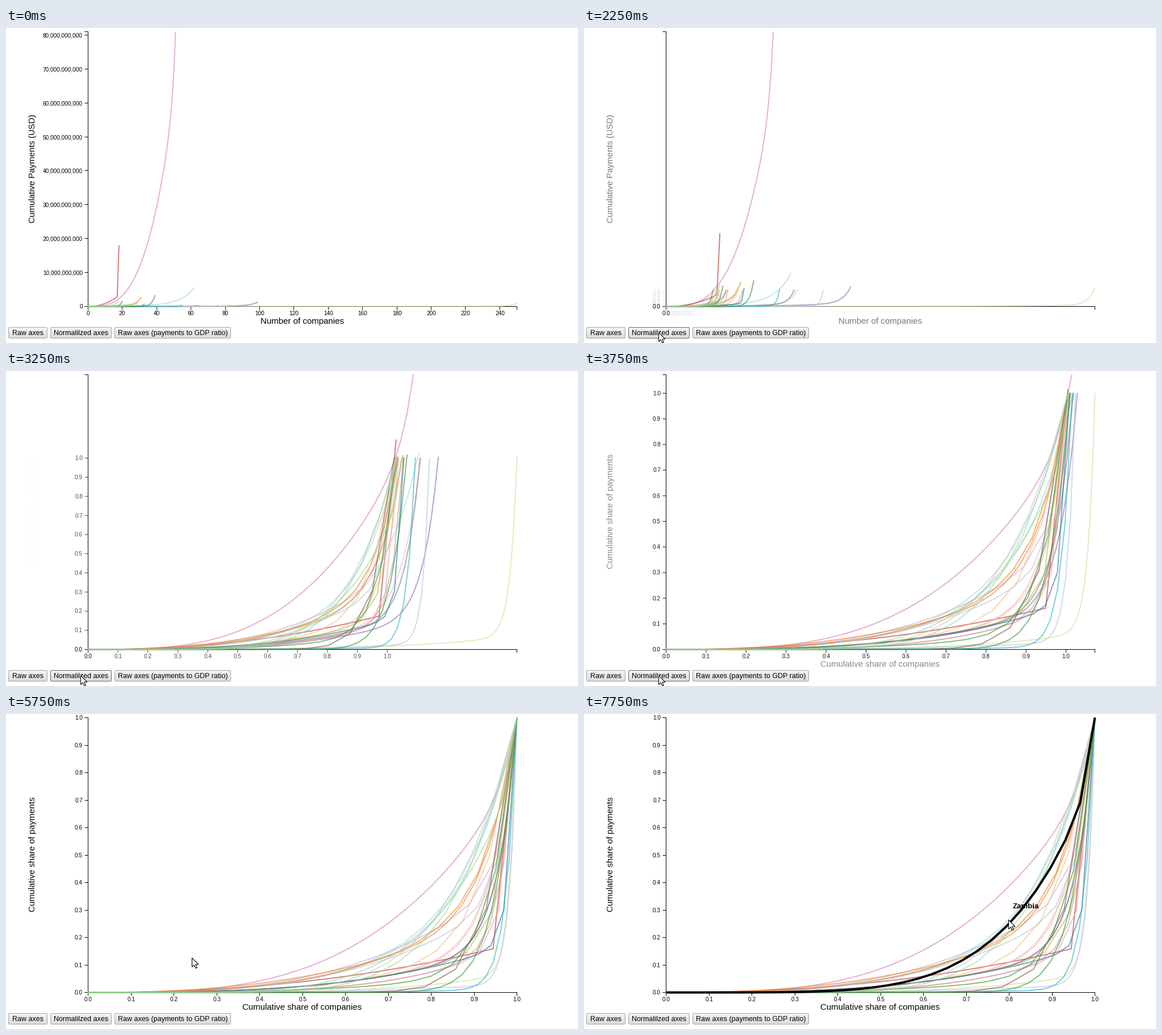
Recreate the animation shown at these times as a matplotlib script. Size 1007 px wide and 556 px high, loop 8 s.

```python
import numpy as np
import matplotlib.pyplot as plt
from matplotlib.animation import FuncAnimation
from matplotlib.colors import to_rgb
from matplotlib.patches import FancyBboxPatch, Polygon

WIDTH, HEIGHT = 1007, 556
STEP, FRAMES = 250, 32
X0, Y0, W, H = 144.5, 491.5, 755, 485
RAW_X, RAW_Y = 250, 81          # companies, billions of USD
START, DURATION = 1520, 3000
SVG_RIGHT = 932
TIP_TIME = 7750
OPACITY = .62

# Category colours come in dark/light pairs.
BLUE, ORANGE, GREEN, RED, PURPLE, BROWN, PINK, GRAY, OLIVE, CYAN = plt.cm.tab20.colors[::2]
(L_BLUE, L_ORANGE, L_GREEN, L_RED, L_PURPLE, L_BROWN, L_PINK, L_GRAY, L_OLIVE,
 L_CYAN) = plt.cm.tab20.colors[1::2]

plt.rcParams["font.family"] = "Liberation Sans"
fig = plt.figure(figsize=((WIDTH + .01) / 72, (HEIGHT + .01) / 72), dpi=72,
                 facecolor="white")
ax = fig.add_axes([0, 0, 1, 1])


def ease(t):
    t = min(max(t, 0), 1)
    return 4 * t ** 3 if t < .5 else 1 - 4 * (1 - t) ** 3


def muted(color, amount=.18):
    rgb = np.array(to_rgb(color))
    return rgb + amount * (rgb @ [.3, .59, .11] - rgb)


class Curve:
    """Concentration curve: a broad part u^body plus a steep part u^tail."""

    def __init__(self, color, count, tail, share=.18, body=3, total=.3):
        self.u = np.arange(count + 1) / count
        self.v = share * self.u ** body + (1 - share) * self.u ** tail
        self.scale = count / RAW_X, total / RAW_Y
        self.color = muted(color)
        self.line, = ax.plot([], [], color=self.color, lw=2, alpha=OPACITY, zorder=2,
                             solid_capstyle="butt", solid_joinstyle="miter")
        curves.append(self)

    def place(self, e):
        sx, sy = (s + (1 - s) * e for s in self.scale)
        self.line.set_data(X0 + W * sx * self.u, Y0 - H * sy * self.v)

    def highlight(self, on):
        self.line.set(color="black" if on else self.color, lw=4 if on else 2,
                      alpha=1 if on else OPACITY, zorder=6 if on else 2)


curves = []
Curve(PINK, 51, 30, share=.79, body=3.2, total=81)
Curve(RED, 18, 200, body=2.2, total=18)
# Broad body
Curve(L_CYAN, 62, 9.6, share=.35, total=5.5)
Curve(L_CYAN, 23, 9, share=.35)
Curve(L_BLUE, 22, 28, share=.36)
Curve(L_PURPLE, 18, 29, share=.43)
Curve(ORANGE, 31, 14, share=.3, body=2.4, total=2.8)
Curve(ORANGE, 22, 15, share=.38)
# Steep tail above a modest body
Curve(L_ORANGE, 16, 13)
Curve(L_ORANGE, 29, 18)
Curve(L_PINK, 66, 17)
Curve(GRAY, 64, 23)
Curve(PURPLE, 99, 23, total=1.3)
Curve(OLIVE, 17, 29)
Curve(L_BROWN, 32, 31, body=4)
Curve(L_RED, 23, 39, body=4)
Curve(BLUE, 33, 58, total=.8)
# Almost pure tail
Curve(L_OLIVE, 250, 63, share=.07, body=4, total=.9)
Curve(L_BLUE, 82, 56, share=.03)
Curve(CYAN, 55, 40, share=.01, total=.5)
Curve(BROWN, 14, 16, share=0)
Curve(GREEN, 20, 17.5, share=.08, total=1.6)
Curve(GREEN, 39, 20, share=0, total=3.3)
Curve(L_GRAY, 20, 6.2, share=0)
Curve(L_GREEN, 18, 6.8, share=0, total=1.7)
zambia = Curve(L_GREEN, 29, 60, share=.8, body=5.2, total=1)


class Tick:
    """An axis tick sliding from one scale to the other while fading."""

    def __init__(self, vertical, start, end, label, opacity):
        self.vertical, self.start, self.end = vertical, start, end
        self.opacity = opacity
        self.mark, = ax.plot([], [], color="black", lw=1, snap=False,
                             solid_capstyle="butt", zorder=1)
        self.text = ax.text(0, 0, label, size=10, va="baseline", zorder=1,
                            ha="right" if vertical else "center")

    def place(self, e, moving):
        p = self.start + (self.end - self.start) * e
        alpha = self.opacity(e)
        x, y = X0 + W * p, Y0 - H * p
        shown = alpha > .001 and (y > -8 if self.vertical else x < SVG_RIGHT)
        for part in (self.mark, self.text):
            part.set_visible(shown)
            part.set_alpha(alpha)
        if not shown:
            return
        if not moving:
            x, y = np.floor(x) + .5, np.floor(y) + .5
        if self.vertical:
            self.mark.set_data([X0 - 6, X0], [y, y])
            self.text.set_position((135, y + 3.5))
        else:
            self.mark.set_data([x, x], [Y0, Y0 + 6])
            self.text.set_position((x, 506.5))


ticks, zeros = [], []
for vertical in (False, True):
    top, step, unit = (RAW_Y, 10, 1e9) if vertical else (RAW_X, 20, 1)
    for v in range(step, top, step):
        ticks.append(Tick(vertical, v / top, v * unit, f"{v * unit:,.0f}",
                          lambda e: 1 - e))
    for i in range(1, 11):
        ticks.append(Tick(vertical, i / 10 / (top * unit), i / 10, f"{i / 10:.1f}",
                          lambda e: e))
    zeros.append(Tick(vertical, 0, 0, "0", lambda e: 1))
ticks += zeros

for xs, ys in (([X0, X0 + W, X0 + W], [Y0, Y0, Y0 + 6]),
               ([X0 - 6, X0, X0, X0 - 6], [Y0 - H, Y0 - H, Y0, Y0])):
    ax.plot(xs, ys, color="black", lw=1, snap=False, zorder=1,
            solid_joinstyle="miter", solid_capstyle="butt")

x_title = ax.text(521, 521.5, "", size=15, ha="center", va="baseline")
y_title = ax.text(50.5, 248, "", size=15, ha="center", va="baseline", rotation=90,
                  rotation_mode="anchor")

buttons = []
for left, right, label in ((4, 73, "Raw axes"), (78, 186, "Normalilzed axes"),
                           (191, 396, "Raw axes (payments to GDP ratio)")):
    shade = np.linspace(.965, .865, 20)[:, None, None] * np.ones(3)
    face = ax.imshow(shade, extent=(left, right, 547.5, 528.5), aspect="auto",
                     interpolation="nearest", zorder=3)
    border = FancyBboxPatch((left + .5, 528.5), right - left - 1, 19, lw=1,
                            boxstyle="round,pad=0,rounding_size=2", fc="none",
                            zorder=4)
    ax.add_patch(border)
    face.set_clip_path(border)
    ax.text((left + right) / 2, 542.3, label, size=12.5, ha="center",
            va="baseline", zorder=5)
    buttons.append((left, right, border))

tip = ax.text(755, 342.5, "Zambia", size=13.3, weight="bold", va="baseline", zorder=7)

ARROW = np.array([(0, 0), (0, 16), (3.7, 12.6), (6.3, 18.3), (8.8, 17.2),
                  (6.3, 11.6), (11.3, 11.6)])
cursor = Polygon(ARROW, closed=True, fc="white", ec="black", lw=1.1, zorder=9,
                 joinstyle="miter")
ax.add_patch(cursor)
# Cursor stops: time, x, y
STOPS = np.array([(250, 432, 546), (750, 225, 524), (1250, 131, 537),
                  (5000, 131, 537), (5750, 327, 430), (7000, 750, 361),
                  (7750, 747, 363)])

ax.set_xlim(0, WIDTH)
ax.set_ylim(HEIGHT, 0)
ax.axis("off")


def update(frame):
    now = frame * STEP
    t = (now - START) / DURATION
    e = ease(t)

    for curve in curves:
        curve.place(e)
    for tick in ticks:
        tick.place(e, 0 < t < 1)
    for tick in zeros:
        tick.text.set_text("0.0" if t > 0 else "0")

    # Titles fade out in the first half and return with new wording.
    late = t >= .5
    x_title.set_text("Cumulative share of companies" if late else "Number of companies")
    y_title.set_text("Cumulative share of payments" if late
                     else "Cumulative Payments (USD)")
    for title in (x_title, y_title):
        title.set_alpha(ease(2 * t - 1) if late else 1 - ease(2 * t))

    cx, cy = (np.interp(now, STOPS[:, 0], STOPS[:, k]) for k in (1, 2))
    entered = now >= STOPS[0, 0]
    cursor.set_visible(entered)
    cursor.set_xy(ARROW + (cx + .5, cy + .5))
    for left, right, border in buttons:
        hover = entered and left <= cx <= right and 528 <= cy <= 548
        border.set_edgecolor("#686868" if hover else "#a5a5a5")

    picked = now >= TIP_TIME
    tip.set_visible(picked)
    zambia.highlight(picked)


anim = FuncAnimation(fig, update, frames=FRAMES, interval=STEP, repeat=True,
                     repeat_delay=0, cache_frame_data=False)
plt.show()
```
